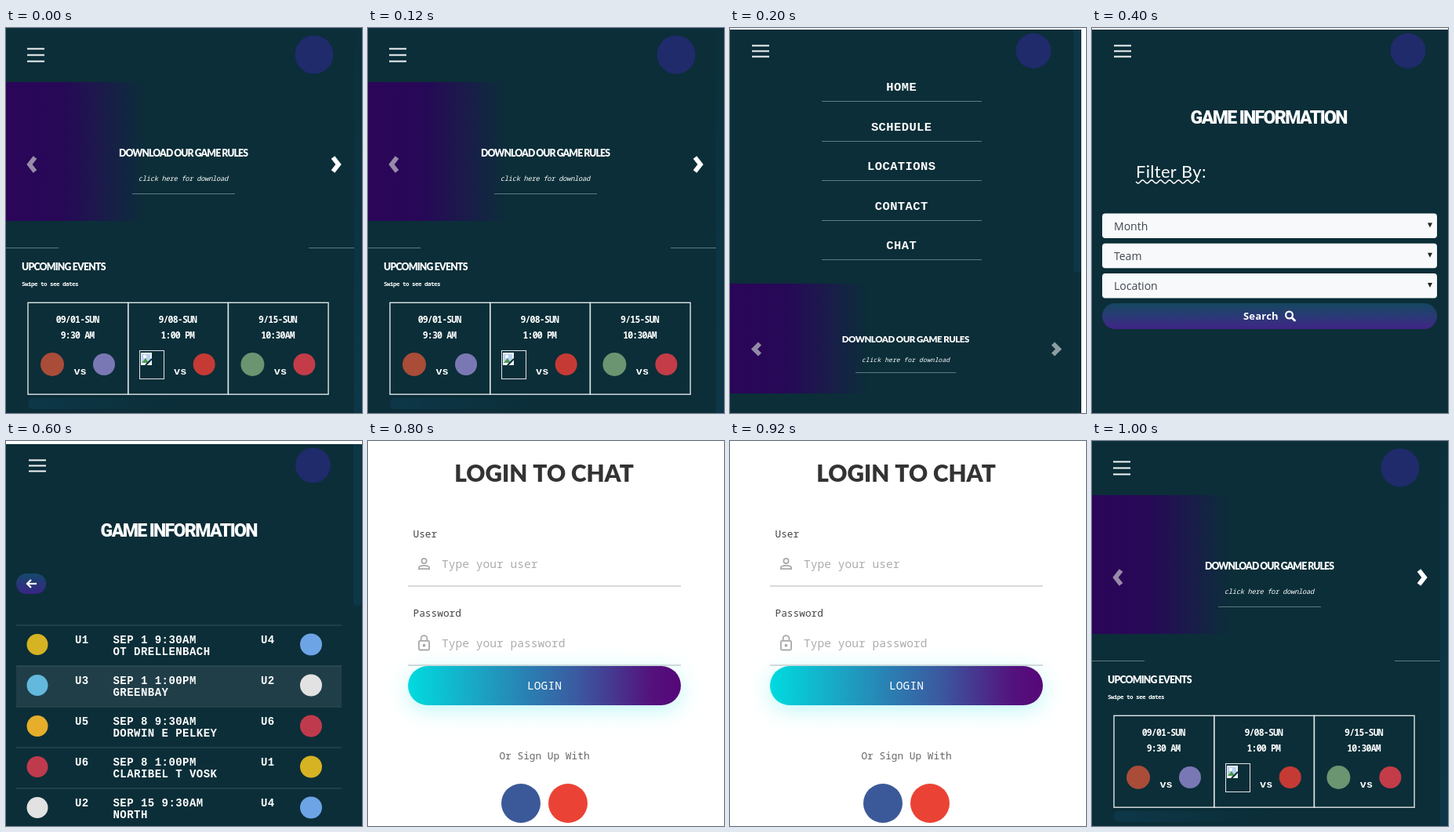
Animation, 454 px wide and 491 px high, one loop 1.2 s. Source, as an HTML page with a canvas:

```html
<!DOCTYPE html>
<html lang="en">
<head>
<meta charset="utf-8">
<title>Soccer league app tour</title>
<style>
  html, body { margin: 0; width: 100%; height: 100%; overflow: hidden; background: #fff; }
  canvas { display: block; }
</style>
</head>
<body>
<canvas id="stage" width="454" height="491"></canvas>
<script>
const W = 454, H = 491, STEP = 200;
const ctx = document.getElementById('stage').getContext('2d');

const BG = '#0b2e38', STRIP = '#0d3746', RULE = '#5d7b81', WHITE = '#fff', NAVY = '#1f2b6b';
const MONO = '"Noto Sans Mono", monospace';
const WIDE = '"Liberation Mono", monospace';
const ROUND = 'Lato, sans-serif';
const SANS = '"Open Sans", sans-serif';

function rect(x, y, w, h, fill, r = 0) {
  ctx.fillStyle = fill;
  ctx.beginPath();
  ctx.roundRect(x, y, w, h, r);
  ctx.fill();
}

function disc(x, y, r, fill) {
  ctx.fillStyle = fill;
  ctx.beginPath();
  ctx.arc(x, y, r, 0, 7);
  ctx.fill();
}

function path(points, color, width, cap = 'butt') {
  ctx.strokeStyle = color;
  ctx.lineWidth = width;
  ctx.lineCap = cap;
  ctx.beginPath();
  points.forEach(([x, y]) => ctx.lineTo(x, y));
  ctx.stroke();
}

function gradient(x0, y0, x1, y1, ...stops) {
  const g = ctx.createLinearGradient(x0, y0, x1, y1);
  stops.forEach(([at, color]) => g.addColorStop(at, color));
  return g;
}

// A size limit `max` lowers the font size until the line fits.
function text(str, x, y, size, family, { style = '', color = WHITE, align = 'left', gap = 0, max = 0 } = {}) {
  ctx.fillStyle = color;
  ctx.textAlign = 'left';
  ctx.letterSpacing = gap + 'px';
  ctx.font = `${style} ${size}px ${family}`;
  while (max && ctx.measureText(str).width > max) {
    size -= 0.25;
    ctx.font = `${style} ${size}px ${family}`;
  }
  const w = ctx.measureText(str).width - gap;
  ctx.fillText(str, align === 'center' ? x - w / 2 : x, y);
}

function page(top, width = W) {
  rect(0, 0, W, H, WHITE);
  rect(0, top, width, H - top, BG);
}

function header(x, y, gap, logoX, logoY, logoR) {
  for (let i = -1; i < 2; i++) rect(x, Math.round(y + i * gap) - 0.5, 22, 2, '#f4f7f8');
  disc(logoX, logoY, logoR, NAVY);
}

function chevron(x, y, w, h, color) {
  path([[x + w, y - h], [x, y], [x + w, y + h]], color, 5.8);
}

function banner(y, h) {
  rect(0, y, 178, h, gradient(0, 0, 178, 0,
    [0, '#2b0559'], [0.4, '#270857'], [0.68, '#1b1a4b'], [0.88, '#112740'], [1, BG]));
}

function headline(x, y) {
  text('GAME INFORMATION', x, y, 24.5, 'Roboto, sans-serif',
    { style: '900', align: 'center', gap: -1.6, max: 200 });
}

function home() {
  page(0);
  rect(0, 0, W, 1, '#0c3444');
  rect(444, 0, 10, H, gradient(0, 0, 0, H, [0, '#0b303c'], [1, '#0d3748']));
  header(27, 34, 8, 393, 34, 24.5);
  banner(69, 177);
  chevron(30, 174, 7, 9, '#978ba8');
  chevron(424, 174, -7, 9, WHITE);
  text('DOWNLOAD OUR GAME RULES', 226.5, 163.5, 14, ROUND,
    { style: '900', align: 'center', gap: -0.9, max: 166 });
  text('click here for download', 226, 195, 8.7, MONO,
    { style: 'italic 500', align: 'center', gap: -0.25 });
  rect(161, 211, 131, 1, RULE);
  rect(0, 280, 67, 1, RULE);
  rect(386, 280, 58, 1, RULE);
  text('UPCOMING EVENTS', 20, 308.5, 14, ROUND, { style: '900', gap: -0.75, max: 107 });
  text('Swipe to see dates', 20, 329, 7.6, MONO, { style: '600', gap: -0.55 });
  rect(28, 472, 200, 14, gradient(28, 0, 228, 0, [0, '#0d3748'], [1, BG]), 6);

  const games = [
    ['09/01-SUN', '9:30 AM', '#a94c38', '#7a78b4'],
    ['9/08-SUN', '1:00 PM', null, '#c63a35'],
    ['9/15-SUN', '10:30AM', '#6b9570', '#c33c48']
  ];
  games.forEach(([day, time, left, right], i) => {
    const x = 28 + i * 127.7, mid = x + 63.5;
    ctx.strokeStyle = '#dfe6e8';
    ctx.lineWidth = 1.4;
    ctx.strokeRect(x, 350.3, 127.7, 116.9);
    text(day, mid, 376, 11.5, MONO, { style: 'bold', align: 'center', gap: -0.8 });
    text(time, mid, 396, 11.5, MONO, { style: 'bold', align: 'center', gap: -0.8 });
    text('vs', mid + 3, 442, 13.5, WIDE, { style: 'bold', align: 'center' });
    if (left) disc(x + 31, 429, 15, left);
    else missing(170, 411);
    disc(x + 97, 429, 14, right);
  });
}

// Browser placeholder for an image that did not load.
function missing(x, y) {
  ctx.strokeStyle = '#dfe6e8';
  ctx.lineWidth = 1;
  ctx.strokeRect(x + 0.5, y + 0.5, 31, 36);
  rect(x + 2, y + 3, 14, 16, '#f2f5f7');
  rect(x + 3, y + 5, 11, 11, '#b9d3f0');
  disc(x + 7, y + 8, 2, WHITE);
  ctx.fillStyle = '#4d9a4b';
  ctx.beginPath();
  ctx.moveTo(x + 3, y + 16);
  ctx.lineTo(x + 8, y + 10);
  ctx.lineTo(x + 12, y + 16);
  ctx.fill();
  path([[x + 8, y + 19], [x + 16, y + 11]], BG, 2);
}

function menu() {
  page(2, 448);
  rect(438, 2, 10, 310, STRIP, [0, 0, 5, 5]);
  header(28, 29, 7.3, 387, 29, 22.5);
  ['HOME', 'SCHEDULE', 'LOCATIONS', 'CONTACT', 'CHAT'].forEach((item, i) => {
    const y = 80 + i * 50.5;
    text(item, 218.5, y, 15.5, WIDE, { style: 'bold', align: 'center', gap: 0.4 });
    rect(117, Math.round(y + 13), 204, 1, RULE);
  });
  banner(326, 140);
  chevron(31, 409.5, 7, 7, '#938ba6');
  chevron(419, 409.5, -7, 7, '#8d9da2');
  text('DOWNLOAD OUR GAME RULES', 224, 401, 12.5, ROUND,
    { style: '900', align: 'center', gap: -0.5, max: 163 });
  text('click here for download', 224, 426, 8, MONO, { style: 'italic 500', align: 'center', gap: 0.08 });
  rect(160, 439, 128, 1, RULE);
}

function filter() {
  page(2);
  header(28, 29, 7.2, 403, 29, 22.5);
  headline(226, 122);
  text('Filter By:', 56, 191, 22, ROUND, { gap: 0.4, max: 90 });
  const wave = [];
  for (let x = 56; x <= 137; x++) wave.push([x, 196 + 2 * Math.sin((x - 56) * 0.55)]);
  path(wave, WHITE, 1.5);

  ['Month', 'Team', 'Location'].forEach((label, i) => {
    const y = 236.5 + i * 38.3;
    rect(13, y, 427, 31.5, '#f7f9fb', 4);
    text(label, 28, y + 21, 14, SANS, { color: '#3f474e' });
    ctx.fillStyle = '#222';
    ctx.beginPath();
    ctx.moveTo(428, y + 12);
    ctx.lineTo(434, y + 12);
    ctx.lineTo(431, y + 18);
    ctx.fill();
  });

  rect(13, 351, 427, 33, gradient(0, 351, 0, 384, [0, '#154760'], [0.5, '#2a3a76'], [1, '#402486']), 16.5);
  text('Search', 193, 372, 13, SANS, { style: 'bold', gap: 0.2 });
  ctx.strokeStyle = WHITE;
  ctx.lineWidth = 2.2;
  ctx.beginPath();
  ctx.arc(251.5, 366, 4.4, 0, 7);
  ctx.stroke();
  path([[255, 369.5], [258.5, 373]], WHITE, 2.8, 'round');
}

const TEAMS = {
  U1: '#d6b322', U2: '#e2e2e2', U3: '#62b9dd', U4: '#6da4e6', U5: '#e6ae2b', U6: '#c03a4d'
};
const FIXTURES = [
  ['U1', 'U4', 'SEP 1 9:30AM', 'OT DRELLENBACH'],
  ['U3', 'U2', 'SEP 1 1:00PM', 'GREENBAY'],
  ['U5', 'U6', 'SEP 8 9:30AM', 'DORWIN E PELKEY'],
  ['U6', 'U1', 'SEP 8 1:00PM', 'CLARIBEL T VOSK'],
  ['U2', 'U4', 'SEP 15 9:30AM', 'NORTH']
];

function schedule() {
  page(4);
  rect(443, 4, 10, 207, STRIP, [0, 0, 5, 5]);
  header(29, 31, 6.8, 391.5, 31, 22.5);
  headline(221, 121.5);

  rect(13, 169, 38, 26, gradient(0, 169, 0, 195, [0, '#15486a'], [1, '#3a2486']), 13);
  path([[27, 182], [39, 182]], WHITE, 2.2);
  path([[32, 177], [27, 182], [32, 187]], WHITE, 2.2);

  FIXTURES.forEach(([a, b, when, where], i) => {
    const y = 234.5 + i * 52;
    if (i === 1) rect(13, y, 415, 52, '#203e48');
    rect(13, y, 415, 1, '#34525a');
    disc(40, y + 25, 13.5, TEAMS[a]);
    disc(389, y + 25, 14, TEAMS[b]);
    const cell = (str, x, dy) => text(str, x, y + dy, 14, WIDE, { style: 'bold', gap: 0.46 });
    cell(a, 88, 23);
    cell(b, 325, 23);
    cell(when, 136.5, 23);
    cell(where, 136.5, 38.5);
  });
}

function field(label, hint, y) {
  text(label, 57.5, y, 12.8, MONO, { color: '#444' });
  text(hint, 94, y + 39, 14.6, MONO, { color: '#adadad' });
  rect(51, y + 61, 348, 2, '#d9d9d9');
}

function login() {
  const ICON = '#a9a9a9';
  rect(0, 0, W, H, WHITE);
  text('LOGIN TO CHAT', 224.5, 52, 30, ROUND,
    { style: '900', color: '#333', align: 'center', max: 230 });
  field('User', 'Type your user', 123);
  field('Password', 'Type your password', 224);

  ctx.strokeStyle = ICON;
  ctx.lineWidth = 1.8;
  ctx.beginPath();
  ctx.arc(71.5, 153, 3.1, 0, 7);
  ctx.stroke();
  ctx.beginPath();
  ctx.moveTo(64.9, 163.1);
  ctx.lineTo(64.9, 161.5);
  ctx.bezierCurveTo(65, 158, 78, 158, 78.1, 161.5);
  ctx.lineTo(78.1, 163.1);
  ctx.closePath();
  ctx.stroke();

  ctx.beginPath();
  ctx.roundRect(64.9, 254.9, 13.2, 11.6, 1.5);
  ctx.moveTo(67.6, 254.5);
  ctx.lineTo(67.6, 252);
  ctx.arc(71.5, 252, 3.9, Math.PI, 0);
  ctx.lineTo(75.4, 254.5);
  ctx.stroke();
  disc(71.5, 260.7, 1.9, ICON);

  ctx.save();
  ctx.shadowColor = 'rgba(0, 219, 222, 0.25)';
  ctx.shadowBlur = 28;
  ctx.shadowOffsetY = 6;
  rect(51, 287, 348, 50, gradient(51, 0, 399, 0,
    [0, '#00dbdf'], [0.3, '#1e9cc0'], [0.62, '#3a5aa0'], [0.9, '#54107c'], [1, '#560878']), 25);
  ctx.restore();
  text('LOGIN', 225, 317, 14.6, MONO, { style: '500', align: 'center' });
  text('Or Sign Up With', 225, 406, 12.8, MONO, { color: '#666', align: 'center' });
  disc(195, 462, 25, '#3b5998');
  disc(255, 462, 25, '#ea4335');
}

const SCENES = [home, menu, filter, schedule, login, home];
const start = performance.now();

function draw() {
  const t = performance.now() - start;
  SCENES[Math.floor(t / STEP) % SCENES.length]();
  requestAnimationFrame(draw);
}
draw();
</script>
</body>
</html>
```
